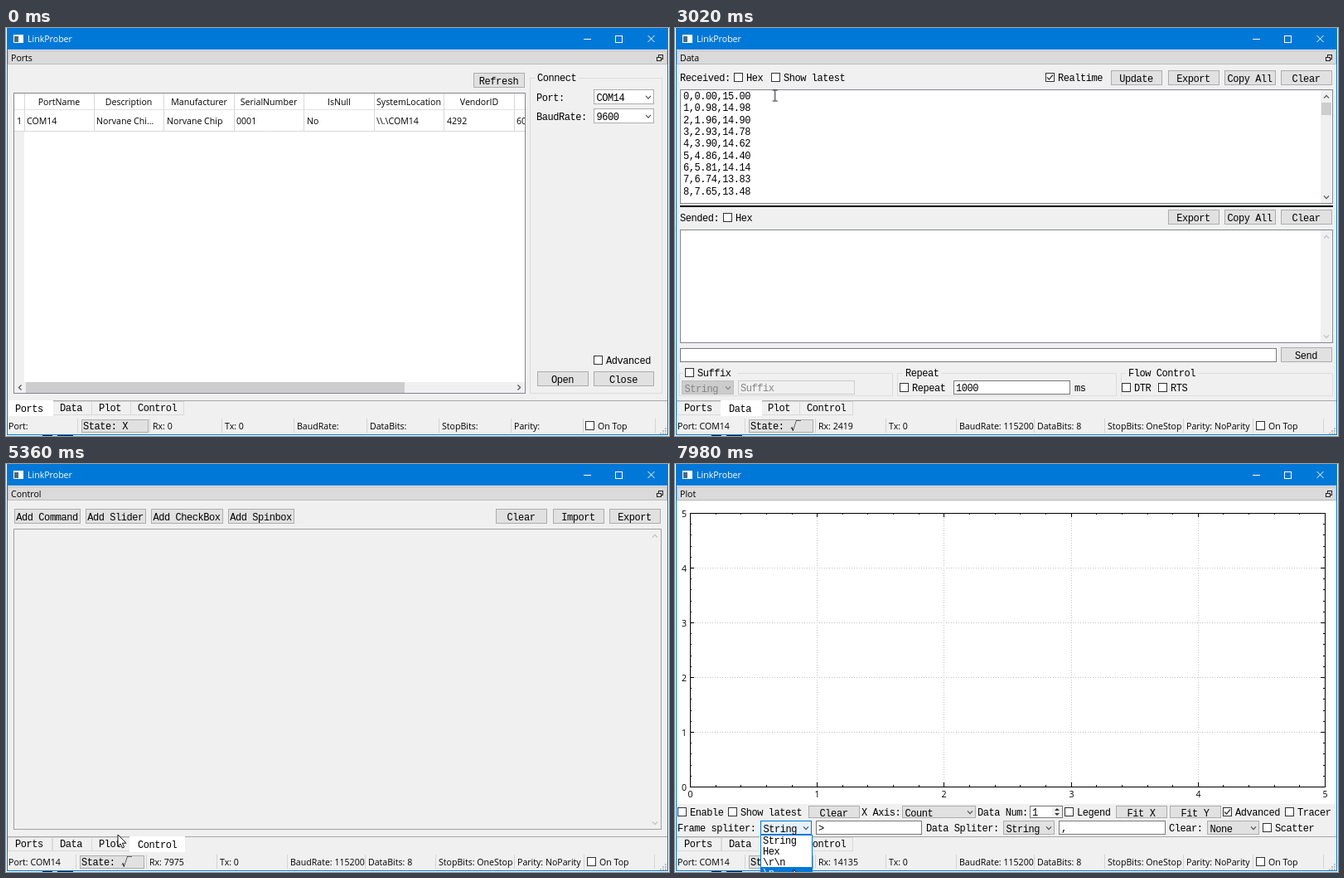
An HTML page with a canvas for the animation above (8 s loop, 800 by 492 pixels).

```html
<!DOCTYPE html>
<html lang="en">
<head>
<meta charset="utf-8">
<title>Serial monitor</title>
<style>
html, body { margin: 0; height: 100%; overflow: hidden; background: #fff; }
canvas { display: block; }
</style>
</head>
<body>
<canvas width="800" height="492"></canvas>
<script>
const c = document.querySelector('canvas').getContext('2d');
const LOOP = 8000, BLUE = '#0078d7', FACE = '#f0f0f0', BTN = '#e1e1e1', EDGE = '#adadad', INK = '#000';
const SELECT = 990, OPEN = 2020, DATA = 2600, LATEST = 3400, CONTROL = 5000, PLOT = 5460,
  ADVANCED = 6620, DROPDOWN = 7340;
const PAGES = ['Ports', 'Data', 'Plot', 'Control'];

// [time, x, y]
const cursorPath = [
  [310, 262, 170], [560, 95, 78], [770, 59, 110], [1340, 59, 110], [1900, 672, 425], [2100, 672, 425],
  [2370, 231, 436], [2520, 80, 458], [2680, 80, 458], [3100, 125, 42], [3280, 123, 60], [3500, 123, 60],
  [3590, 135, 60], [3850, 138, 62], [4500, 190, 320], [4900, 183, 458], [5080, 183, 458], [5360, 135, 447],
  [5430, 127, 457], [5560, 127, 457], [6300, 664, 438], [6660, 668, 438], [7040, 181, 434],
  [7220, 134, 438], [7400, 134, 438], [7780, 143, 489]
];
// [time, bytes received]
const rxPath = [[OPEN, 0], [2370, 822], [3590, 3819], [5360, 7975], [7040, 11900], [7980, 14135], [8000, 14183]];

function sample(path, t, ease) {
  if (t <= path[0][0]) return path[0].slice(1);
  const i = path.findIndex(p => p[0] > t);
  if (i < 0) return path.at(-1).slice(1);
  const a = path[i - 1], b = path[i], u = (t - a[0]) / (b[0] - a[0]);
  const k = ease ? u * u * (3 - 2 * u) : u;
  return a.slice(1).map((v, j) => v + (b[j + 1] - v) * k);
}

function fill(x, y, x2, y2, color) {
  c.fillStyle = color;
  c.fillRect(x, y, x2 - x, y2 - y);
}
// The border lies inside the given edges.
function box(x, y, x2, y2, color, edge = EDGE) {
  if (color) fill(x, y, x2, y2, color);
  c.lineWidth = 1;
  c.strokeStyle = edge;
  c.strokeRect(x + .5, y + .5, x2 - x - 1, y2 - y - 1);
}
function line(color, width, ...p) {
  c.strokeStyle = color;
  c.lineWidth = width;
  c.beginPath();
  for (let i = 0; i < p.length; i += 2) c.lineTo(p[i], p[i + 1]);
  c.stroke();
}
function write(font, spacing, s, x, y, color, align) {
  c.font = font;
  c.letterSpacing = spacing;
  c.fillStyle = color;
  c.textAlign = align;
  c.fillText(s, x, y);
}
const mono = (s, x, y, color = INK, align = 'left') =>
  write('12px "Liberation Mono", monospace', '-0.45px', s, x, y, color, align);
const sans = (s, x, y, color = INK, align = 'left', weight = 400) =>
  write(weight + ' 10.6px "Open Sans", sans-serif', '0px', s, x, y, color, align);

function button(s, x, x2, y, h = 18, color = BTN, edge = EDGE) {
  box(x, y, x2, y + h, color, edge);
  mono(s, (x + x2) / 2 - .5, y + h / 2 + 5, INK, 'center');
}
function check(s, x, y, on = false, edge = '#333') {
  box(x - 1, y - 10, x + 10, y + 1, '#fff', edge);
  if (on) line(edge, 1.2, x + 1, y - 4.5, x + 3.5, y - 2, x + 8, y - 7.5);
  mono(s, x + 14, y);
}
function chevron(x, y, dir, color = '#505050') {
  const [dx, dy] = { down: [0, 1], up: [0, -1], left: [-1, 0], right: [1, 0] }[dir];
  line(color, 1.2, x - 1.6 * dx - 3 * dy, y - 1.6 * dy - 3 * dx, x + 1.6 * dx, y + 1.6 * dy,
    x - 1.6 * dx + 3 * dy, y - 1.6 * dy + 3 * dx);
}
function combo(s, x, x2, y, h, color = BTN, edge = EDGE, ink = INK) {
  box(x, y, x2, y + h, color, edge);
  mono(s, x + 3.5, y + h / 2 + 5, ink);
  chevron(x2 - 7, y + h / 2 + .5, 'down', ink === INK ? '#505050' : ink);
}
function edit(s, x, x2, y, h, ink = INK, edge = '#7a7a7a') {
  box(x, y, x2, y + h, ink === INK ? '#fff' : FACE, edge);
  mono(s, x + 3, y + h / 2 + 4.5, ink);
}
function group(title, x, x2, y, y2, titleX) {
  box(x, y, x2, y2, null, '#dcdcdc');
  if (!title) return;
  fill(titleX - 3, y - 3, titleX + title.length * 6.75 + 3, y + 4, FACE);
  mono(title, titleX, y + 4);
}
function scrollbar(x, y, y2, ink) {
  fill(x, y, x + 13, y2, FACE);
  chevron(x + 7, y + 8, 'up', ink);
  chevron(x + 7, y2 - 7, 'down', ink);
}

function drawPorts(t, pointer) {
  const selected = t >= SELECT && t < OPEN;
  button('Refresh', 564, 626, 54);
  box(9, 78, 627, 441, '#fff', '#828790');
  c.save();
  c.beginPath();
  c.rect(10, 79, 616, 361);
  c.clip();
  fill(10, 125, 22, 427, FACE);
  if (selected) {
    fill(10, 79, 627, 99, '#bcdcf4');
    fill(10, 99, 22, 124, '#bcdcf4');
    fill(23, 99, 627, 124, BLUE);
  }
  const names = ['PortName', 'Description', 'Manufacturer', 'SerialNumber', 'IsNull', 'SystemLocation', 'VendorID', ''];
  const cells = ['COM14', 'Norvane Chi...', 'Norvane Chip', '0001', 'No', '\\\\.\\COM14', '4292', '60000'];
  line('#d8d8d8', 1, 10, 124.5, 627, 124.5);
  line('#e2e2e2', 1, 10, 98.5, 627, 98.5);
  line('#d8d8d8', 1, 22.5, 79, 22.5, 124);
  names.forEach((name, i) => {
    const x = Math.round(22 + i * 84.45), next = Math.round(x + 84.45);
    line('#d8d8d8', 1, next + .5, 79, next + .5, 124);
    c.save();
    c.beginPath();
    c.rect(x + 2, 79, 82, 46);
    c.clip();
    sans(name, x + 42, 93, INK, 'center', selected ? 700 : 400);
    sans(cells[i], x + 3, 116, selected ? '#fff' : INK);
    c.restore();
  });
  if (selected) {
    c.setLineDash([1, 1]);
    box(23, 99, 106, 124, null, '#d09050');
    c.setLineDash([]);
  }
  sans('1', 13, 116, INK, 'left', selected ? 700 : 400);
  const hover = pointer[1] > 427 && pointer[1] < 441 && pointer[0] < 481;
  fill(10, 427, 627, 441, FACE);
  fill(24, 427, 481, 440, hover ? '#a8a8a8' : '#cdcdcd');
  c.restore();
  chevron(17, 433.5, 'left');
  chevron(619, 433.5, 'right');

  group('Connect', 632, 792, 60, 441, 641);
  mono('Port:', 640, 88);
  combo('COM14', 709, 782, 74, 18, '#fff');
  mono('BaudRate:', 640, 111);
  combo(t < 120 ? '9600' : '115200', 709, 782, 97, 18, '#fff');
  check('Advanced', 710, 405);
  if (t >= 1900) button('Open', 641, 703, 414, 18, '#e1e7ed', '#3a84c0');
  else button('Open', 641, 703, 414);
  button('Close', 709, 782, 414);
}

function dataLine(n) {
  const a = n * Math.PI / 64;
  return `${n},${(20 * Math.sin(a)).toFixed(2)},${(20 * Math.cos(a) - 5).toFixed(2)}`;
}

function drawData(t, rx) {
  const latest = t >= LATEST, last = Math.floor(rx / 15.65);
  mono('Received:', 6, 64);
  check('Hex', 72, 64);
  check('Show latest', 117, 64, latest, t > 3200 && t < 3900 ? BLUE : '#333');
  check('Realtime', 448, 64, true);
  button('Update', 526, 588, 51);
  button('Export', 595, 657, 51);
  button('Copy All', 663, 725, 51);
  button('Clear', 731, 793, 51);

  box(6, 74, 794, 212, '#fff', '#828790');
  const first = latest ? Math.max(0, last - 7) : 0;
  for (let i = 0; i < (latest ? 8 : 9) && first + i <= last; i++) mono(dataLine(first + i), 10, 86 + i * 14.33);
  scrollbar(779, 75, 211);
  const size = Math.max(15, 104 * 9 / (last + 2)), top = latest ? 196 - size : 90;
  fill(780, top, 792, top + size, '#cdcdcd');
  fill(6, 214, 794, 216, INK);

  mono('Sended:', 6, 233);
  check('Hex', 59, 233);
  button('Export', 595, 657, 219);
  button('Copy All', 663, 725, 219);
  button('Clear', 731, 793, 219);
  box(6, 243, 794, 380, '#fff', '#828790');
  scrollbar(779, 244, 379, '#bfbfbf');
  edit('', 6, 726, 386, 17);
  button('Send', 731, 793, 385);

  group('', 5, 263, 416, 444);
  fill(10, 411, 75, 422, FACE);
  check('Suffix', 13, 420);
  combo('String', 8, 71, 425, 17, '#ccc', '#bfbfbf', '#838383');
  edit('Suffix', 76, 217, 425, 17, '#838383', '#ccc');
  group('Repeat', 268, 533, 416, 444, 278);
  check('Repeat', 272, 438);
  edit('1000', 336, 477, 425, 17);
  mono('ms', 482, 438);
  group('Flow Control', 538, 794, 416, 444, 547);
  check('DTR', 540, 438);
  check('RTS', 584, 438);
}

function drawControl() {
  [['Add Command', 10, 90], ['Add Slider', 96, 169], ['Add CheckBox', 175, 262], ['Add Spinbox', 268, 348],
    ['Clear', 591, 653], ['Import', 660, 722], ['Export', 728, 790]].forEach(b => button(...b, 54));
  box(9, 78, 791, 441, FACE, '#a0a0a0');
  scrollbar(776, 79, 440, '#bfbfbf');
}

function drawAxes(bottom) {
  const left = 18, right = 784, top = 59, dx = (right - left) / 5, dy = (bottom - top) / 5;
  const snap = v => Math.round(v) + .5;
  for (let i = 0; i <= 25; i++) {
    const x = snap(left + i * dx / 5), y = snap(bottom - i * dy / 5), major = i % 5 === 0, len = major ? 5 : 2;
    if (major && i && i < 25) {
      c.setLineDash([1, 2]);
      line('#c4c4c4', 1, x, top, x, bottom);
      line('#c4c4c4', 1, left, y, right, y);
      c.setLineDash([]);
    }
    line(INK, 1, x, top, x, top + len);
    line(INK, 1, x, bottom, x, bottom - len);
    line(INK, 1, left, y, left + len, y);
    line(INK, 1, right, y, right - len, y);
    if (major) {
      sans(i / 5, x, bottom + 13, INK, 'center');
      sans(i / 5, 14, y + 4, INK, 'right');
    }
  }
  box(left, top, right + 1, bottom + 1, null, INK);
}

function drawPlot(t) {
  const advanced = t >= ADVANCED, shift = advanced ? 0 : 19, y = 424 + shift;
  fill(2, 45, 798, 410 + shift, '#fff');
  drawAxes(389 + shift);
  check('Enable', 4, y);
  check('Show latest', 65, y);
  button('Clear', 161, 223, y - 12, 15);
  mono('X Axis:', 225, y);
  combo('Count', 274, 363, y - 12, 15);
  mono('Data Num:', 365, y);
  edit('1', 428, 468, y - 12, 15);
  fill(455, y - 11, 467, y + 2, FACE);
  for (const [dir, dy] of [[-1, -6], [1, -3]]) {
    c.fillStyle = '#333';
    c.beginPath();
    c.moveTo(458, y + dy);
    c.lineTo(464, y + dy);
    c.lineTo(461, y + dy + dir * 3);
    c.fill();
  }
  check('Legend', 471, y);
  button('Fit X', 532, 594, y - 12, 15);
  button('Fit Y', 597, 659, y - 12, 15);
  check('Advanced', 662, y, advanced);
  check('Tracer', 737, y);
  if (!advanced) return;
  const lit = ['#e5f1fb', BLUE];
  mono('Frame spliter:', 3, 443);
  combo('String', 103, 165, 430, 17, ...(t > 7180 ? lit : []));
  edit('>', 170, 298, 430, 17);
  mono('Data Spliter:', 303, 443);
  combo('String', 396, 458, 430, 17);
  edit(',', 463, 592, 430, 17);
  mono('Clear:', 596, 443);
  combo('None', 642, 705, 430, 17, ...(t < 7090 ? lit : []));
  check('Scatter', 710, 443);
}

function drawTabs(page) {
  const edges = [[2, 56], [56, 104], [103, 151], [150, 215]], labels = [11, 65, 112, 159];
  fill(2, 449, 798, 450, '#a8a8a8');
  edges.forEach(([x, x2], i) => {
    if (i === page) return;
    box(x, 450, x2, 467, FACE, '#d9d9d9');
    mono(PAGES[i], labels[i], 462);
  });
  const [x, x2] = edges[page];
  fill(Math.max(2, x - 1), 449, x2 + 1, 468, '#fff');
  mono(PAGES[page], labels[page], 463);
}

function drawStatus(open, rx) {
  const seps = open ? [84, 169, 254, 339, 433, 518, 613, 697, 782] : [86, 173, 260, 347, 435, 522, 609, 696, 783];
  seps.forEach(x => fill(x, 471, x + 1, 488, '#d4d4d4'));
  const at = open ? [3, 173, 258, 343, 437, 522, 617] : [3, 177, 264, 351, 439, 526, 613];
  const values = open ? ['COM14', Math.round(rx), 0, '115200', '8', 'OneStop', 'NoParity'] : ['', 0, 0, '', '', '', ''];
  ['Port', 'Rx', 'Tx', 'BaudRate', 'DataBits', 'StopBits', 'Parity']
    .forEach((name, i) => sans(`${name}: ${values[i]}`, at[i], 484));
  const x = open ? 89 : 91;
  box(x, 472, open ? 167 : 172, 488, BTN);
  mono(open ? 'State:' : 'State: X', x + 2, 484);
  if (open) write('13px "Noto Sans CJK SC", sans-serif', '0px', '√', 139, 484, INK, 'left');
  box(open ? 701 : 699, 474, open ? 712 : 710, 485, '#fff', '#333');
  sans('On Top', open ? 716 : 714, 484);
  for (let i = 0; i < 3; i++)
    for (let j = 0; j <= i; j++) fill(795 - 3 * j, 482 + 3 * i, 797 - 3 * j, 484 + 3 * i, '#bfbfbf');
}

function drawWindow(page) {
  fill(0, 0, 800, 492, '#fff');
  fill(1, 0, 799, 491, BLUE);
  fill(2, 26, 798, 490, FACE);
  fill(44, 491, 56, 492, '#123');
  fill(62, 491, 81, 492, '#123');
  fill(9, 8, 21, 18, '#fff');
  fill(10, 10, 15, 17, '#4a6a80');
  sans('LinkProber', 26, 17, '#fff');
  line('#fff', 1, 697, 13.5, 706, 13.5);
  box(735, 9, 744, 18, null, '#fff');
  line('#fff', 1, 774.5, 9, 782.5, 17);
  line('#fff', 1, 782.5, 9, 774.5, 17);
  box(2, 27, 798, 44, '#dadada', '#bcbcbc');
  sans(PAGES[page], 6, 40);
  box(787, 32, 793, 38, null, '#222');
  box(785, 35, 791, 40, '#dadada', '#222');
}

function drawDropdown() {
  box(103, 447, 166, 500, '#fff', BLUE);
  fill(104, 486, 165, 492, BLUE);
  ['String', 'Hex', '\\r\\n', '\\n'].forEach((s, i) => mono(s, 106, 458 + i * 13, i === 3 ? '#fff' : INK));
}

function drawCursor(page, [x, y]) {
  const overText = page === 1 && x < 778 && (y > 74 && y < 211 || y > 243 && y < 403)
    || page === 2 && y > 430 && y < 448 && x > 170 && x < 297;
  if (overText) {
    line('#222', 1, x - 3, y - 6.5, x + 3, y - 6.5);
    line('#222', 1, x, y - 6, x, y + 6);
    line('#222', 1, x - 3, y + 6.5, x + 3, y + 6.5);
    return;
  }
  const arrow = [0, 0, 0, 14, 3.2, 11, 5.4, 16, 7.6, 15, 5.4, 10.2, 10, 10.2];
  c.beginPath();
  for (let i = 0; i < arrow.length; i += 2) c.lineTo(x + arrow[i], y + arrow[i + 1]);
  c.closePath();
  c.fillStyle = '#fff';
  c.fill();
  c.lineWidth = 1;
  c.strokeStyle = '#111';
  c.stroke();
}

function draw(now) {
  const t = Math.floor(now % LOOP / 10) * 10;
  const page = t < DATA ? 0 : t < CONTROL ? 1 : t < PLOT ? 3 : 2;
  const pointer = sample(cursorPath, t, true), [rx] = sample(rxPath, t);
  drawWindow(page);
  [drawPorts, drawData, drawPlot, drawControl][page](t, page === 1 ? rx : pointer);
  drawTabs(page);
  drawStatus(t >= OPEN, rx);
  if (t >= DROPDOWN) drawDropdown();
  if (t >= 120) drawCursor(page, pointer);
}

const start = performance.now();
function tick() {
  draw(performance.now() - start);
  requestAnimationFrame(tick);
}
tick();
</script>
</body>
</html>
```
